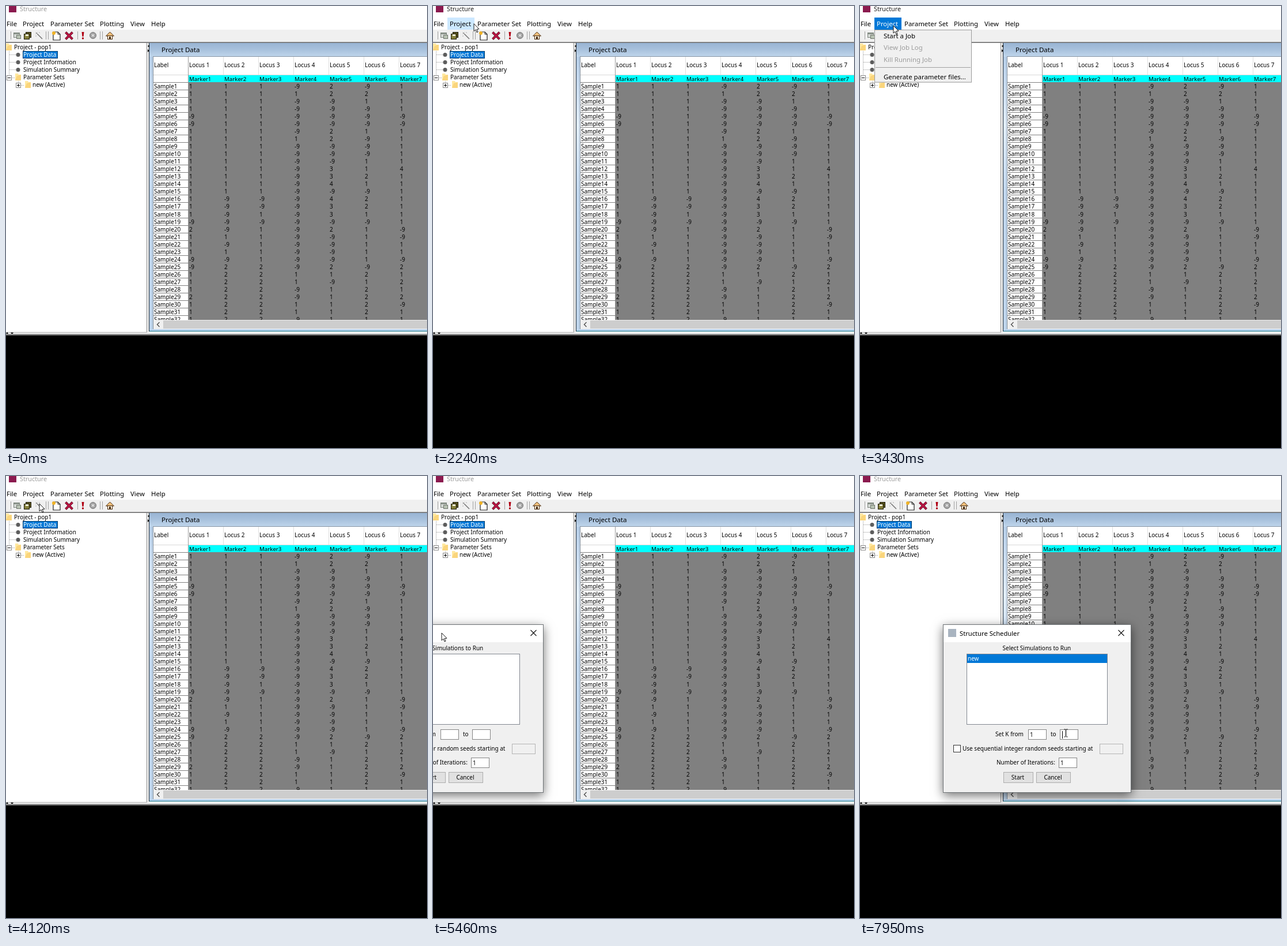
Recreate the animation shown at these times as an HTML page with a canvas. Size 731 by 766 pixels, loop 8 s.

```html
<!DOCTYPE html>
<html lang="en">
<head>
<meta charset="utf-8">
<title>Structure</title>
<style>
html, body { margin: 0; width: 100%; height: 100%; overflow: hidden; background: #000; }
canvas { display: block; width: 100vw; height: 100vh; }
</style>
</head>
<body>
<canvas id="stage" width="731" height="766"></canvas>
<script>
const LOOP = 8000;
const BLUE = '#0078d7';
const stage = document.getElementById('stage');
const screen2d = stage.getContext('2d');
let g = screen2d;

// ---- drawing helpers ----
function box(x, y, w, h, fill, stroke) {
  if (fill) { g.fillStyle = fill; g.fillRect(x, y, w, h); }
  if (stroke) {
    g.strokeStyle = stroke;
    g.lineWidth = 1;
    g.strokeRect(x + 0.5, y + 0.5, w - 1, h - 1);
  }
}

function text(s, x, y, size = 10, color = '#000', weight = 400, align = 'left') {
  g.font = `${weight} ${size}px "Noto Sans", "Open Sans", sans-serif`;
  g.fillStyle = color;
  g.textAlign = align;
  g.fillText(s, x, Math.round(y));
}

function path(points, fill, stroke, width = 1, close = true) {
  g.beginPath();
  for (let i = 0; i < points.length; i += 2) g.lineTo(points[i], points[i + 1]);
  if (close) g.closePath();
  if (fill) { g.fillStyle = fill; g.fill(); }
  if (stroke) { g.strokeStyle = stroke; g.lineWidth = width; g.stroke(); }
}

const line = (x1, y1, x2, y2, color, width = 1) =>
  path([x1, y1, x2, y2], null, color, width, false);

function disc(x, y, r, fill, stroke) {
  g.beginPath();
  g.arc(x, y, r, 0, Math.PI * 2);
  g.fillStyle = fill;
  g.fill();
  if (stroke) { g.strokeStyle = stroke; g.lineWidth = 1; g.stroke(); }
}

function cross(x, y, r, color, width) {
  line(x - r, y - r, x + r, y + r, color, width);
  line(x + r, y - r, x - r, y + r, color, width);
}

function ramp(x, y, w, h, ...colors) {
  const grad = g.createLinearGradient(0, y, 0, y + h);
  colors.forEach((c, i) => grad.addColorStop(i / (colors.length - 1), c));
  box(x, y, w, h, grad);
}

function dotted(draw) {
  g.setLineDash([1, 1]);
  draw();
  g.setLineDash([]);
}

// ---- main window ----
const MENUS = { File: 1, Project: 29, 'Parameter Set': 77, Plotting: 163, View: 216, Help: 252 };

const menuLabel = (name, color) =>
  text(name, MENUS[name], 35, 11.4, color, name === 'View' ? 400 : 500);

function toolbar() {
  box(0, 41, 731, 21, '#f0f0f0');
  box(0, 62, 731, 1, '#a0a0a0');
  box(0, 63, 731, 1, '#696969');
  for (const x of [8, 69, 73, 124, 163, 167]) box(x, 44, 1, 14, '#a0a0a0');
  // window
  box(13, 46, 11, 9, '#d5d9d5', '#7c857c');
  box(14, 47, 9, 2, '#8d968d');
  box(18, 50, 8, 7, '#b9c3b4', '#6f776c');
  // disks
  box(34, 45, 10, 10, '#5c5620', '#1c1a08');
  box(31, 48, 10, 10, '#85803c', '#1c1a08');
  box(34, 49, 5, 3, '#f4f2dc');
  // wand
  line(54, 48, 63, 57, '#777', 1.6);
  cross(53, 47, 1.5, '#999', 1);
  line(57, 45, 59, 47, '#aaa');
  line(51, 52, 53, 52, '#aaa');
  // new page
  path([82, 45, 90, 45, 94, 49, 94, 59, 82, 59], '#fff', '#222', 1.2);
  path([90, 45, 90, 49, 94, 49], null, '#222', 1, false);
  disc(83, 47, 3, '#f0b429');
  cross(109.5, 51.5, 6, '#6b0f26', 4);
  cross(109.5, 51.5, 5.5, '#c01545', 2.4);
  // run and stop
  path([131.5, 45, 135.5, 45, 134.5, 53, 132.5, 53], '#b00012');
  disc(133.5, 56, 1.7, '#b00012');
  disc(151, 51, 5.5, '#a2a2a2', '#777');
  cross(151, 51, 2, '#e6e6e6', 1.3);
  // house
  path([173.5, 52, 180.5, 45, 187.5, 52], '#f3c27c', '#4a2c12');
  box(176, 51, 9, 7, '#fff3dc', '#4a2c12');
  box(179, 53, 3, 4, '#4a2c12');
}

function folder(x, y) {
  path([x, y, x + 5, y, x + 6, y + 2, x + 10, y + 2, x + 10, y + 12, x, y + 12], '#ffe8a0');
  path([x + 3, y + 4, x + 10, y + 2, x + 10, y + 12, x, y + 12], '#fad57c');
}

function expander(x, y, plus) {
  box(x - 4, y - 4, 9, 9, '#fff', '#8a8a8a');
  box(x - 2, y, 5, 1, '#000');
  if (plus) box(x, y - 2, 1, 5, '#000');
}

function tree() {
  box(0, 64, 244, 502, '#fff');
  dotted(() => {
    line(5.5, 78, 5.5, 120, '#999');
    line(21.5, 130, 21.5, 133, '#999');
    line(10, 124.5, 16, 124.5, '#999');
    line(26, 137.5, 32, 137.5, '#999');
  });
  folder(0, 65);
  text('Project - pop1', 14, 75);
  box(29, 78, 61, 13, BLUE);
  dotted(() => box(29, 78, 61, 13, null, '#000'));
  ['Project Data', 'Project Information', 'Simulation Summary'].forEach((label, i) => {
    const y = 84.5 + 13 * i;
    dotted(() => line(6, y, 17, y, '#999'));
    disc(21, y, 3.5, '#5d5d5d');
    text(label, 30, y + 3.5, 10, i ? '#000' : '#fff');
  });
  expander(5, 124);
  folder(16, 117);
  text('Parameter Sets', 30, 127);
  expander(21, 137, true);
  folder(33, 130);
  text('new (Active)', 46, 140);
}

// Genotype at each locus as a rule of the row; -9 marks missing data
const LOCI = [
  r => [0, 5, 6].includes(r % 19) ? -9 : r > 19 && r % 9 === 2 ? 2 : 1,
  r => r > 24 ? 2 : r > 20 ? (r % 2 ? 1 : -9) : r > 15 ? -9 : 1,
  r => r > 24 ? 2 : r > 15 && r < 20 && r !== 18 ? -9 : 1,
  r => (r < 10 ? r % 6 === 2 : r > 25 && r % 4 > 1) ? 1 : -9,
  r => {
    const d = Math.abs(r - 15);
    if (d && d < 4) return d > 1 ? 3 : 4;
    if (r > 25) return r === 27 ? -9 : 1;
    return d && (r % 6 === 1 || r % 6 === 2) && r !== 19 ? 2 : -9;
  },
  r => {
    if (r > 25) return r % 27 && r < 32 ? 2 : 1;
    if (r < 12) return r === 2 ? 2 : r % 4 === 3 ? 1 : -9;
    if (r % 10 === 5 || r === 19) return -9;
    return r > 12 && r < 18 && r % 4 < 2 ? 2 : 1;
  },
  r => {
    if (r % 15 === 5 || r % 15 === 6 || (r > 23 && r % 6 === 0)) return -9;
    return r > 24 && r < 30 && r % 2 ? 2 : r === 12 ? 4 : 1;
  }
];

function table() {
  ramp(249, 64, 482, 24, '#98b4d3', '#a9c2dd', '#c0d6ec');
  ramp(249, 88, 7, 472, '#b4cce6', '#dfebf7', '#bfd5ec', '#bdd3ea', '#bdd3ea');
  text('Project Data', 270, 80, 11.6);
  box(256, 88, 475, 456, '#fff');
  box(255, 88, 1, 472, '#7f8b98');
  box(255, 87, 476, 1, '#8593a3');
  box(256, 119, 475, 1, '#d9d9d9');
  box(317, 120, 414, 12, '#00ffff');
  box(317, 132, 414, 412, '#808080');
  box(256, 132, 61, 1, '#808080');
  box(316, 88, 1, 456, '#9a9a9a');
  text('Label', 257, 106);
  LOCI.forEach((_, c) => {
    const x = 318 + 61 * c;
    if (c) box(x - 2, 88, 1, 32, '#dedede');
    text('Locus ' + (c + 1), x, 106);
    text('Marker' + (c + 1), x, 130, 9.7);
  });
  g.save();
  g.beginPath();
  g.rect(256, 120, 475, 424);
  g.clip();
  for (let r = 1; r <= 32; r++) {
    const y = 139 + 13.03 * (r - 1);
    text('Sample' + r, 257, y + 4);
    box(256, Math.round(y + 6), 61, 1, '#808080');
    LOCI.forEach((rule, c) => text(rule(r), 318 + 61 * c, y + 4));
  }
  g.restore();
  // scroll bar and lower frame
  box(256, 544, 475, 16, '#f0f0f0');
  box(273, 545, 458, 14, '#cdcdcd');
  path([266.5, 548, 262.5, 552, 266.5, 556], null, '#505050', 1.4, false);
  box(249, 560, 482, 3, '#b9d4ee');
  box(249, 563, 482, 1, '#14788c');
}

function mainWindow() {
  box(0, 0, 731, 766, '#000');
  box(0, 0, 731, 571, '#f0f0f0');
  box(0, 0, 731, 41, '#fff');
  box(5, 0, 13, 11, '#8b1a4f');
  for (const name in MENUS) menuLabel(name, '#000');
  toolbar();
  tree();
  table();
  box(244, 64, 1, 502, '#8a8a8a');
  box(248, 64, 1, 500, '#1e2a36');
  path([249, 67, 249, 72, 246, 69.5], '#000');
  path([246, 75, 246, 80, 249, 77.5], '#000');
  box(0, 565, 245, 1, '#b4b4b4');
  path([0, 568, 4, 568, 2, 565], '#000');
  path([8, 566, 13, 566, 10.5, 569], '#000');
  box(0, 568, 731, 1, '#b8b8b8');
  box(0, 569, 731, 2, '#757575');
}

// ---- menus; "-" is a separator, "~" a disabled item ----
const PROJECT = ['Start a Job', '~View Job Log', '~Kill Running Job', '-', 'Generate parameter files...'];
const PARAMS = ['New...', '~Modify...', 'Show List', '-', '~Run', '~Rename', '-', '~Remove'];

function popup(x, w, items, hot) {
  const bars = items.filter(s => s === '-').length;
  box(x, 41, w, 10 + 20.4 * (items.length - bars) + 10 * (bars - 1), '#f0f0f0', '#9b9b9b');
  let y = 52;
  for (const item of items) {
    if (item === '-') {
      box(x + 2, Math.round(y - 7), w - 4, 1, '#a0a0a0');
      y += 10;
      continue;
    }
    const off = item[0] === '~', lit = item === hot;
    if (lit) box(x + 1, y - 10, w - 2, 20, BLUE);
    text(item.replace('~', ''), x + 16, y + 4, 11.4, lit ? '#fff' : off ? '#9c9c9c' : '#000', off ? 400 : 500);
    y += 20.4;
  }
}

function tab(name, open) {
  const x = MENUS[name] - 4;
  box(x, 20, name === 'Project' ? 47 : 85, 21, open ? BLUE : '#cce8ff');
  menuLabel(name, open ? '#fff' : '#000');
}

function menus(t) {
  if (t < 1860 || t >= 3970) return;
  const open = t >= 2650;
  const params = open ? t >= 2804 && t < 3036 : t < 2180;
  tab(params ? 'Parameter Set' : 'Project', open);
  if (!open) return;
  if (params) popup(73, 165, PARAMS);
  else popup(25, 169, PROJECT, t >= 3580 && 'Start a Job');
}

// ---- scheduler dialog ----
const smooth = p => p * p * (3 - 2 * p);
const progress = (t, from, to) => Math.max(0, Math.min(1, (t - from) / (to - from || 1)));

// Dragged in from beyond the left edge
function dialogPlace(t) {
  const p = progress(t, 5290, 5680);
  return [Math.round(-327 + 471 * smooth(p)), Math.round(257 + 119 * (1 - p) ** 12)];
}

function button(label, x, w) {
  box(x, 256, w, 19, '#e1e1e1', '#adadad');
  text(label, x + w / 2 - 1, 269, 10, '#000', 400, 'center');
}

function field(x, y, w, value = '') {
  box(x, y, w, 18, '#fff', '#858585');
  text(value, x + 3, y + 13);
}

function caret(t) {
  const second = t >= 7700, typed = t >= 7160;
  const blinkOff = (t >= 6770 && t < 6940) || (t >= 7630 && !second);
  if (t >= 6240 && !blinkOff) box(second ? 207 : typed ? 157 : 151, 185, 1, 13, '#000');
}

function dialog(t) {
  if (t < 5290) return;
  const picked = t >= 6240;
  g.save();
  g.translate(...dialogPlace(t));
  g.shadowColor = 'rgba(0,0,0,.55)';
  g.shadowBlur = 17;
  g.shadowOffsetY = 5;
  box(0, 0, 327, 292, '#f0f0f0');
  g.shadowColor = 'transparent';
  box(0, 0, 327, 31, '#fff');
  box(0, 0, 327, 292, null, '#6d7275');
  box(9, 8, 14, 14, '#a9b4c0');
  text('Structure Scheduler', 29, 20, 11.2);
  cross(309.5, 15, 5, '#111', 1.1);

  text('Select Simulations to Run', 103.5, 45);
  box(41, 51, 245, 123, '#fff', '#828790');
  if (picked) box(42, 52, 243, 15, BLUE);
  text('new', 43, 63, 10, picked ? '#fff' : '#000');

  text('Set K from', 91, 194);
  field(148, 182, 32, t >= 7160 ? '1' : '');
  text('to', 187, 194);
  field(203, 182, 32);
  box(18, 209, 13, 13, '#fff', '#333');
  text('Use sequential integer random seeds starting at', 34, 219);
  box(272, 207, 41, 18, '#f0f0f0', '#b4b4b4');
  text('Number of Iterations:', 93, 243);
  field(201, 231, 32, '1');
  button('Start', 105, 52);
  button('Cancel', 162, 60);
  caret(t);
  g.restore();
}

// ---- pointer: from, to (ms), then where it comes to rest ----
const MOVES = [
  [290, 1060, 86, 93],
  [1140, 1210, 85, 84],
  [1600, 1940, 76, 31],
  [2100, 2480, 60, 30],
  [2500, 2950, 82, 32],
  [2960, 3200, 58, 34],
  [3500, 3720, 58, 48],
  [5290, 5290, 294, 272],
  [5758, 6070, 236, 314],
  [6070, 6260, 324, 449],
  [6770, 6940, 332, 454],
  [7160, 7390, 354, 447],
  [7630, 7780, 357.5, 445.5]
];

function pointerAt(t) {
  if (t >= 5290 && t < 5758) return dialogPlace(t).map((v, i) => v + (i ? 15 : 150));
  let x = 546, y = 638;
  for (const [from, to, tx, ty] of MOVES) {
    if (t < from) break;
    const p = from === to ? 1 : smooth(progress(t, from, to));
    x += (tx - x) * p;
    y += (ty - y) * p;
  }
  return [x, y];
}

function pointer(t) {
  if (t < 290 || (t >= 4430 && t < 5290)) return;
  g.save();
  g.translate(...pointerAt(t));
  if (t >= 6240) {
    line(0, -6, 0, 6, '#000', 1.2);
    for (const e of [-6.5, 6.5]) {
      line(-3, e, -0.7, e, '#000');
      line(0.7, e, 3, e, '#000');
    }
  } else {
    path([0, 0, 0, 13, 3, 10.3, 5, 15, 7, 14.2, 5, 9.6, 9, 9.2], '#fff', '#000', 0.9);
  }
  g.restore();
}

// ---- loop ----
const backdrop = document.createElement('canvas');
backdrop.width = stage.width;
backdrop.height = stage.height;
g = backdrop.getContext('2d');
mainWindow();
g = screen2d;

function draw(t) {
  g.drawImage(backdrop, 0, 0);
  text('Structure', 24, 9, 10.8, t >= 1380 && t < 4120 ? '#1a1a1a' : '#999');
  menus(t);
  dialog(t);
  pointer(t);
}

const start = performance.now();
function tick() {
  draw((performance.now() - start) % LOOP);
  requestAnimationFrame(tick);
}
tick();
</script>
</body>
</html>
```
